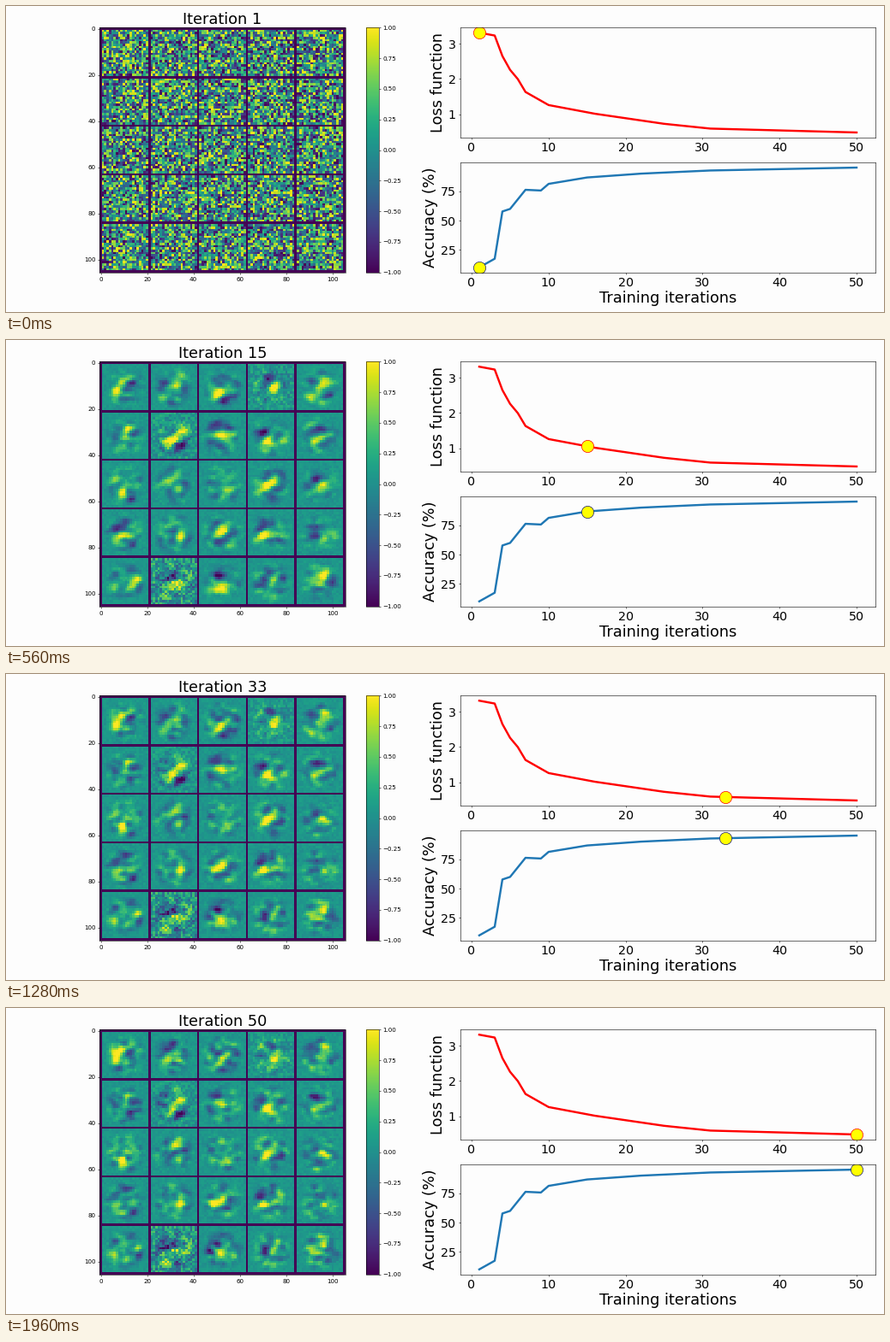
Write a matplotlib script that moves like this. It is 1024 by 358 pixels and loops after 2 s.

```python
import numpy as np
import matplotlib.pyplot as plt
from matplotlib.animation import FuncAnimation

W, H, DPI = 1024, 358, 51.2
STEPS, INTERVAL = 50, 40
SIDE, TILES = 20, 5
UNITS = TILES ** 2
PAPER = "#fdfdfd"

# Bends of the training curves as (iteration, value).
LOSS = [(1, 3.31), (3, 3.23), (4, 2.65), (5, 2.26), (6, 2.0), (7, 1.635),
        (10, 1.265), (16, 1.02), (25, .735), (31, .6), (50, .49)]
ACCURACY = [(1, 9.8), (3, 17.2), (4, 57.8), (5, 60), (7, 76.4), (9, 75.8),
            (10, 81.5), (15, 87), (22, 90.3), (31, 93), (50, 95.5)]

rng = np.random.default_rng(4)
yy, xx = np.mgrid[:SIDE, :SIDE]
disc = np.exp(-(np.hypot(xx - 9.5, yy - 10) / 8) ** 6)


def stroke(x, y, angle, length, width):
    along = (xx - x) * np.cos(angle) - (yy - y) * np.sin(angle)
    across = (xx - x) * np.sin(angle) + (yy - y) * np.cos(angle)
    return np.exp(-.5 * ((along / length) ** 2 + (across / width) ** 2))


def random_feature():
    """A bright slanted pen stroke with a dark one beside it."""
    x, y = rng.normal((10, 10.5), 1.8)
    angle = rng.uniform(.3, 1.2)
    gap = rng.choice([-4, 4])
    dark = stroke(x + gap * np.sin(angle), y + gap * np.cos(angle),
                  angle, 2.8, 1.6)
    return stroke(x, y, angle, 2.8, 1.4) - .7 * dark


def smooth_texture(sx, sy):
    """Gaussian-blurred noise tiles of unit deviation inside the disc."""
    fx, fy = np.fft.fftfreq(SIDE), np.fft.fftfreq(SIDE)[:, None]
    kernel = np.exp(-2 * np.pi ** 2 * ((fx * sx) ** 2 + (fy * sy) ** 2))
    noise = rng.normal(size=(UNITS, SIDE, SIDE))
    out = np.fft.ifft2(np.fft.fft2(noise) * kernel).real
    return out / out.std() * disc


initial = rng.uniform(-1, 1, (UNITS, SIDE, SIDE))
features = np.array([random_feature() for _ in range(UNITS)]) * disc
early, late = smooth_texture(1.5, 1), smooth_texture(1.2, .9)

# A few units keep much of their initial noise.
noise_floor = np.full(UNITS, .07)
noise_floor[[3, 6, 21]] = .16, .18, .4
noise_rate = np.where(noise_floor > .1, .2, .55)


def weights(k):
    """Mosaic of all hidden units at iteration k."""
    noise = noise_floor + (1 - noise_floor) * np.exp(-noise_rate * (k - 1))
    learned = 1 - np.exp(-.45 * (k - 1))
    age = (k - 1) / (STEPS - 1)
    turn = age * np.pi / 2
    texture = .27 * np.cos(turn) * early + .32 * np.sin(turn) * late
    tiles = noise[:, None, None] * initial \
        + learned * (.06 + (1 - .25 * age) * features + texture)
    step = SIDE + 1
    mosaic = np.full((TILES * step + 1,) * 2, -1.0)
    for i, tile in enumerate(tiles):
        top, left = (1 + step * n for n in divmod(i, TILES))
        mosaic[top:top + SIDE, left:left + SIDE] = tile
    return mosaic.clip(-1, 1)


def add_axes(left, top, right, bottom):
    return fig.add_axes([left / W, 1 - bottom / H,
                         (right - left) / W, (bottom - top) / H],
                        facecolor=PAPER)


def add_curve(ax, bends, color, edge, label):
    x = np.arange(1, STEPS + 1)
    y = np.interp(x, *zip(*bends))
    ax.plot(x, y, color=color, lw=3.4)
    ax.set_ylabel(label, fontsize=25)
    ax.tick_params(labelsize=20)
    marker, = ax.plot([], [], "o", ms=20, mfc="yellow", mec=edge)
    return marker, x, y


plt.rcParams["font.family"] = "DejaVu Sans"
fig = plt.figure(figsize=(W / DPI, H / DPI), dpi=DPI, facecolor=PAPER)

image_ax = add_axes(109.3, 25.4, 395.5, 311.6)
image = image_ax.imshow(weights(1), cmap="viridis", vmin=-1, vmax=1,
                        interpolation="nearest", aspect="auto")
title = image_ax.set_title("", fontsize=25)
fig.colorbar(image, cax=add_axes(420.3, 25.4, 434.7, 311.6),
             ticks=np.linspace(-1, 1, 9))

loss_ax = add_axes(530, 25.4, 1014, 153.8)
accuracy_ax = add_axes(530, 183.2, 1014, 311.6)
curves = [add_curve(loss_ax, LOSS, "red", "red", "Loss function"),
          add_curve(accuracy_ax, ACCURACY, "C0", "midnightblue",
                    "Accuracy (%)")]
accuracy_ax.set_xlabel("Training iterations", fontsize=25)


def update(frame):
    k = frame + 1
    image.set_data(weights(k))
    title.set_text(f"Iteration {k}")
    for marker, x, y in curves:
        marker.set_data([x[frame]], [y[frame]])


anim = FuncAnimation(fig, update, frames=STEPS, interval=INTERVAL, repeat=True)
plt.show()
```
